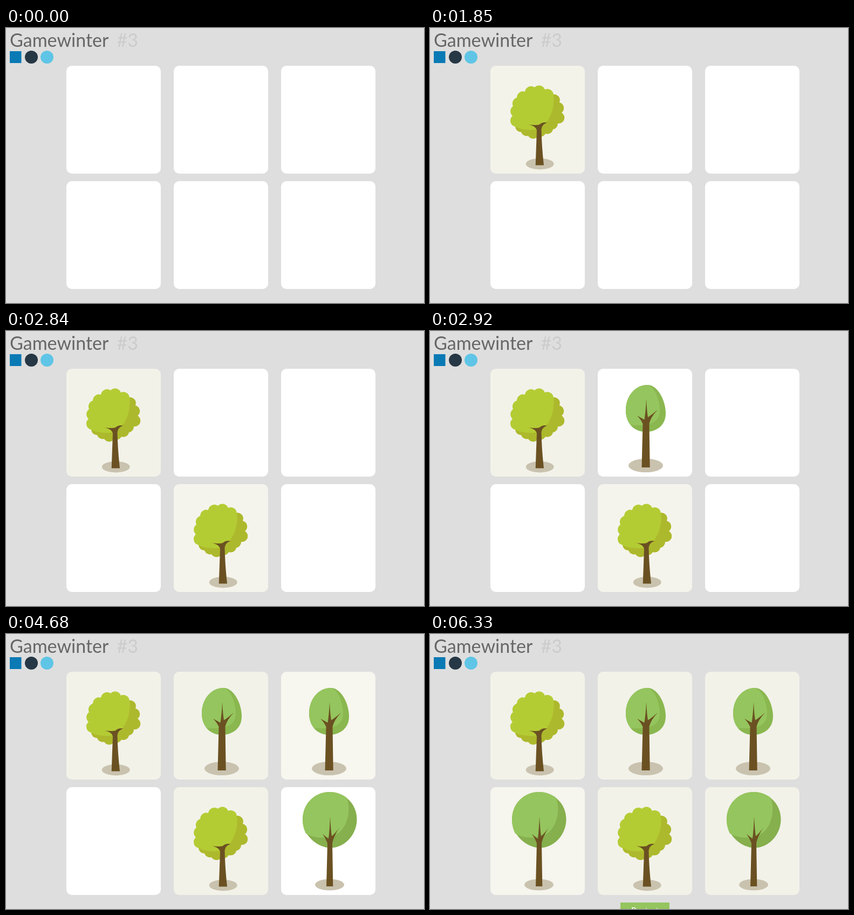
An HTML page that plays this animation: 775 by 510 pixels, repeating every 7640 ms.

```html
<!DOCTYPE html>
<html lang="en">
<head>
<meta charset="utf-8">
<title>Tree cards</title>
<style>
  html, body { margin: 0; width: 100%; height: 100%; overflow: hidden; background: #dedede; }
  svg { display: block; width: 775px; height: 510px; font-family: Lato, sans-serif; }
  .wood { fill: #6b5122; }
  .shadow { fill: #c9c2ae; }
</style>
</head>
<body>
<svg id="stage" viewBox="0 0 775 510">
  <defs>
    <g id="bushy">
      <path id="bushyShade" fill="#adb92c"/>
      <path id="bushyLight" fill="#b4cc34"/>
      <ellipse class="shadow" cx="91.7" cy="182" rx="26" ry="10.4"/>
      <path class="wood" d="M83.7 184.5L86 120Q84 111 69 109Q86 111 91 109Q96 104 105 105.3Q95 110 94.5 118Q95 148 99 184.5Z"/>
    </g>
    <g id="egg">
      <path fill="#8ab74f" d="M92 30C112 30 126 60 126 83C126 104 110 117 89 117C66 117 52 100 52 77C52 50 70 30 92 30Z"/>
      <path fill="#95c55e" d="M92 30C107 34 115 60 115 78C115 98 98 108 61 104C55 97 52 88 52 77C52 50 70 30 92 30Z"/>
      <ellipse class="shadow" cx="89" cy="179.5" rx="32" ry="12.6"/>
      <path class="wood" d="M81.5 183L83.5 102Q80 94 73 87L86.5 94.5Q89 78 90 56Q91 78 93 90Q102 84 111 76Q98 90 95.5 102L96.7 183Z"/>
    </g>
    <g id="round">
      <path fill="#86af4d" d="M90 9C118 9 140.5 31 140.5 60C140.5 88 118 112.5 92 112.5C66 112.5 40 88 40 60C40 31 62 9 90 9Z"/>
      <path fill="#95c55e" d="M46 86C42 78 40 70 40 60C40 31 62 9 90 9C102 9 112 13 121 19C129 35 126 64 112 80C98 96 66 98 46 86Z"/>
      <ellipse class="shadow" cx="90" cy="181" rx="27" ry="10.6"/>
      <path class="wood" d="M84 184L86 104Q83 95 77 87L88 96Q90 78 91 54Q92 78 94 91Q101 85 108 75Q97 92 95 104L96.3 184Z"/>
    </g>
  </defs>

  <text x="7" y="34.5" font-size="34" fill="#666">Gamewinter</text>
  <text x="205.5" y="34.5" font-size="34" fill="#ccc">#3</text>
  <rect x="7" y="43" width="21.5" height="22" fill="#0a7ab5"/>
  <circle cx="47" cy="54" r="12" fill="#263746"/>
  <circle cx="76" cy="54" r="12" fill="#5fc5e6"/>
  <g id="cards"></g>
  <g id="restart">
    <rect x="353" y="498" width="91" height="40" fill="#95c55e"/>
    <text x="398.5" y="520" font-size="16.5" fill="#fff" text-anchor="middle">Restart</text>
  </g>
</svg>
<script>
const LOOP = 7640;
const RESTART_AT = 5540;
const SETTLED = '#f2f2e9';

// Times at which the tree appears, the card tints, and the tint settles.
const cards = [
  { col: 0, row: 0, tree: 'bushy', show: 960,  tint: 1850, settle: 2840, color: '#f4f3ea' },
  { col: 1, row: 0, tree: 'egg',   show: 2920, tint: 3800, settle: 4680, color: '#f5f4eb' },
  { col: 2, row: 0, tree: 'egg',   show: 3870, tint: 4680, settle: 5540, color: '#f7f6ef' },
  { col: 0, row: 1, tree: 'round', show: 5540, tint: 6330, settle: LOOP, color: '#f6f5ee' },
  { col: 1, row: 1, tree: 'bushy', show: 1870, tint: 2840, settle: 3800, color: '#f5f4ec' },
  { col: 2, row: 1, tree: 'round', show: 4680, tint: 5540, settle: 6330, color: '#f7f6ef' },
];

const byId = id => document.getElementById(id);

function add(parent, tag, attributes) {
  const node = document.createElementNS('http://www.w3.org/2000/svg', tag);
  for (const name in attributes) node.setAttribute(name, attributes[name]);
  return parent.appendChild(node);
}

// Leafy outline: one outward arc between each pair of notches.
const scallop = ([first, ...rest], radius) =>
  `M${first}` + rest.map(p => `A${radius} ${radius} 0 0 1 ${p}`).join('');

const leftNotches = [[46, 113], [41, 93], [42, 75], [49, 59], [64, 48], [82, 40], [101, 44], [117, 53]];
const rightNotches = [[117, 53], [128, 68], [132, 87], [125, 107], [116, 118], [102, 126],
  [88, 131], [70, 130], [57, 123], [46, 113]];
byId('bushyShade').setAttribute('d', scallop(rightNotches, 10.8) + 'Z');
byId('bushyLight').setAttribute('d',
  scallop(leftNotches, 11.5) + 'C120 80 109 104 94 115C84 121 60 120 46 113Z');

for (const card of cards) {
  const group = add(byId('cards'), 'g', {
    transform: `translate(${112 + 199 * card.col} ${70 + 214 * card.row})`,
  });
  card.face = add(group, 'rect', { width: 175, height: 200, rx: 10 });
  card.image = add(group, 'use', { href: '#' + card.tree });
}

const setVisible = (node, visible) => { node.style.display = visible ? '' : 'none'; };

function draw() {
  const t = performance.now() % LOOP;
  for (const card of cards) {
    setVisible(card.image, t >= card.show);
    card.face.setAttribute('fill', t < card.tint ? '#fff' : t < card.settle ? card.color : SETTLED);
  }
  setVisible(byId('restart'), t >= RESTART_AT);
  requestAnimationFrame(draw);
}
draw();
</script>
</body>
</html>
```
